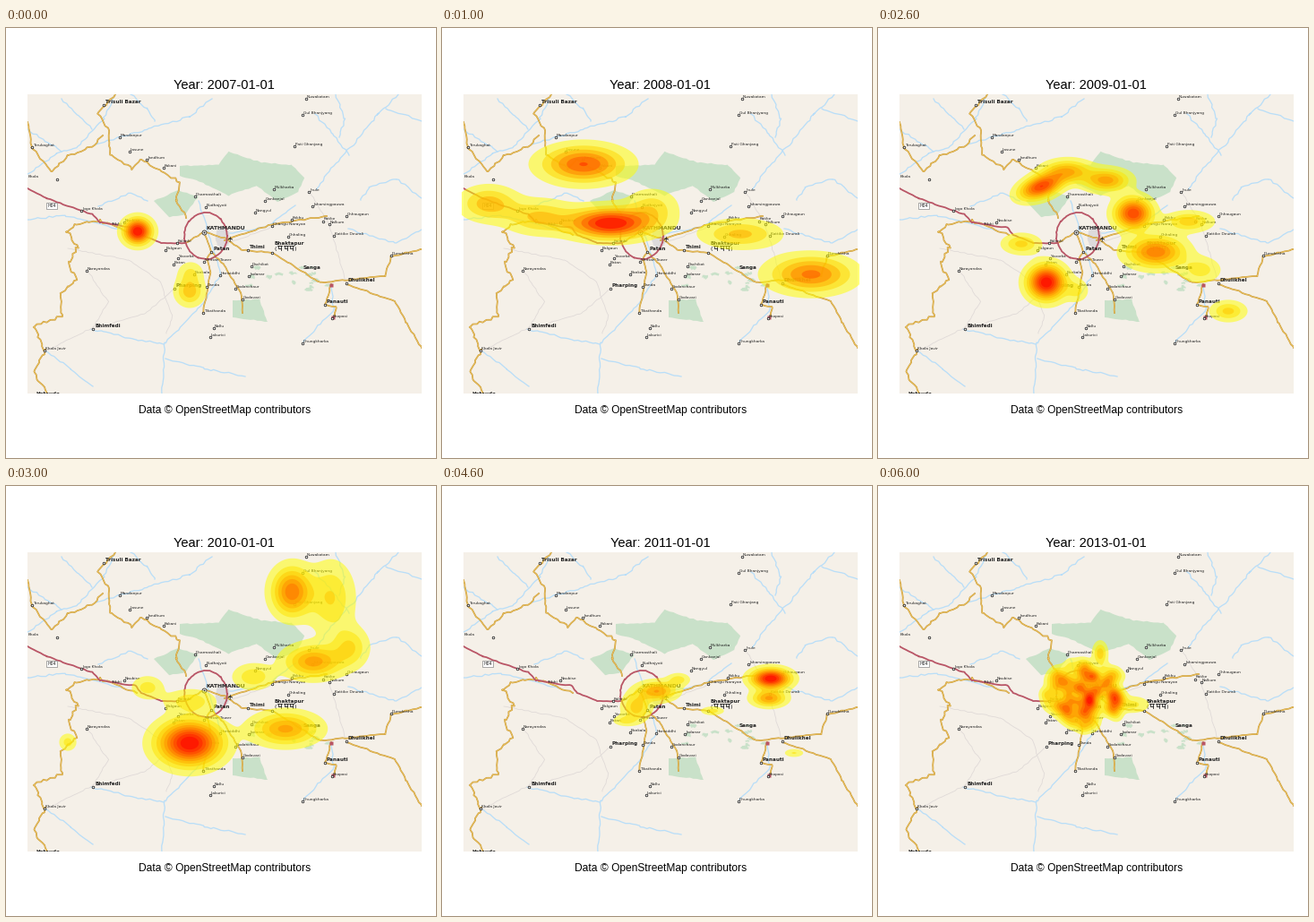
A matplotlib script for the animation above (7 s loop, 480 px wide and 480 px high).

```python
import numpy as np
import matplotlib.pyplot as plt
from matplotlib.animation import FuncAnimation

PT = 0.72  # points per pixel at 100 dpi
PAPER, WOOD, WATER, TOWN = "#f5f0e8", "#c9e1c9", "#b9def8", "#dddbdc"
ROAD, ROAD_EDGE, TRUNK, LANE = "#f0c766", "#c99a35", "#b95566", "#dfd9d7"
INK = "#222222"

rng = np.random.default_rng(7)
fig = plt.figure(figsize=(4.8, 4.8), dpi=100, facecolor="white")


def pixel_axes(x, y, w, h, color):
    """Axes whose data units are stage pixels, y pointing down."""
    ax = fig.add_axes([x / 480, 1 - (y + h) / 480, w / 480, h / 480],
                      facecolor=color)
    ax.set(xlim=(x, x + w), ylim=(y + h, y), xticks=[], yticks=[])
    ax.set_autoscale_on(False)
    ax.spines[:].set_visible(False)
    return ax


base = pixel_axes(24, 74, 440, 334, PAPER)
heat = pixel_axes(0, 0, 480, 480, "none")


def winding(points, amount, step=4):
    """Subdivide a polyline and jitter the new vertices."""
    x, y = np.array(points, float).T
    dist = np.r_[0, np.cumsum(np.hypot(np.diff(x), np.diff(y)))]
    t = np.union1d(dist, np.arange(0, dist[-1], step))
    xy = np.array([np.interp(t, dist, x), np.interp(t, dist, y)])
    xy[:, 1:-1] += rng.uniform(-amount, amount, (2, len(t) - 2))
    return xy


def oval(x, y, rx, ry, count=24):
    a = np.linspace(0, 2 * np.pi, count)
    return list(zip(x + rx * np.cos(a), y + ry * np.sin(a)))


def area(points, color=WOOD, amount=0.6):
    base.fill(*winding(points, amount), color=color, lw=0, zorder=1)


def line(points, color, width, z, amount):
    base.plot(*winding(points, amount), color=color, lw=width * PT, zorder=z)


def river(*points):
    line(points, WATER, 1.3, 2, 1)


def lane(*points):
    line(points, LANE, 0.8, 3, 0.7)


def road(*points, amount=0.7):
    xy = winding(points, amount)
    base.plot(*xy, color=ROAD_EDGE, lw=1.7 * PT, zorder=4)
    base.plot(*xy, color=ROAD, lw=0.7 * PT, zorder=5)


def trunk(points):
    line(points, TRUNK, 1.8, 6, 0.5)


def dot(x, y, size=2.6, color="white"):
    base.plot(x, y, "o", ms=size * PT, mfc=color, mec=INK, mew=0.8 * PT,
              zorder=8)


def label(x, y, name, size=4.4, weight="normal", **style):
    base.text(x, y, name, fontsize=size * PT, weight=weight, color=INK,
              family="DejaVu Sans", zorder=9, clip_on=True, **style)


def town(x, y, name, marked=True):
    if marked:
        dot(x, y)
    label(x + 2, y - 2, name, 5.7, "bold")


def villages(start, end, *names):
    """Spread names evenly from start to end."""
    for (x, y), name in zip(np.linspace(start, end, len(names)), names):
        dot(x, y)
        label(x + 1, y - 1, name)


# woods and built-up land
area([(194, 154), (237, 153), (248, 138), (285, 150), (319, 153), (333, 167),
      (326, 183), (303, 194), (280, 176), (248, 187), (218, 172), (194, 165)])
area([(165, 193), (192, 181), (215, 188), (200, 208), (182, 211)])
area([(253, 304), (283, 303), (292, 328), (253, 323)])
for x, y in rng.uniform((268, 262), (365, 292), (16, 2)):
    area(oval(x, y, rng.uniform(2, 6), rng.uniform(1, 3), 9), amount=1)
area(oval(242, 234, 8, 12), TOWN)

# rivers
river((24, 163), (57, 140), (80, 133), (109, 101), (122, 74))
river((24, 113), (62, 138))
river((230, 79), (205, 99), (158, 113), (100, 130))
river((139, 74), (157, 90), (166, 104))
river((62, 79), (82, 99), (96, 113))
river((438, 74), (415, 96), (394, 123), (357, 164), (347, 180))
river((345, 96), (365, 119), (383, 142))
river((368, 74), (378, 102), (372, 122))
river((464, 104), (424, 90))
river((464, 190), (436, 168), (405, 178), (396, 192))
river((464, 225), (434, 240), (382, 224))
river((24, 214), (66, 209), (132, 226))
river((103, 199), (139, 184), (158, 193))
river((215, 193), (240, 275), (219, 309), (177, 352), (174, 408))
river((176, 353), (146, 348), (95, 336))
river((178, 369), (221, 380), (267, 389))
river((332, 350), (366, 315), (363, 286))
river((250, 229), (292, 222), (323, 198))
river((44, 360), (72, 381), (97, 400))

# lanes
lane((69, 246), (137, 259), (172, 283), (186, 323), (179, 341))
lane((91, 271), (114, 306), (98, 334), (45, 360))
lane((188, 291), (156, 318), (98, 336))
lane((380, 286), (361, 219), (339, 183))
lane((251, 239), (297, 222))

# roads
road((122, 74), (103, 95), (114, 113), (117, 142), (140, 157), (151, 147),
     (194, 172), (190, 192), (201, 212), amount=1.2)
road((24, 105), (29, 133), (51, 160), (69, 143), (97, 132), (108, 120),
     amount=1.2)
road((146, 231), (104, 215), (76, 219), (68, 227), (80, 244), (70, 262),
     (78, 280), (60, 297), (62, 322), (32, 333), (43, 359), (31, 386),
     (46, 408), amount=1.6)
road((248, 237), (262, 247), (297, 251), (351, 284), (423, 277), (430, 255),
     (464, 247))
road((380, 286), (434, 305), (447, 329), (464, 357))
road((363, 286), (356, 309), (369, 311), (366, 323))
road((229, 250), (243, 264), (262, 295), (264, 318))
road((225, 258), (228, 272), (220, 318))
road((244, 237), (298, 219), (358, 210))
road((200, 240), (221, 228), (248, 236))
road((221, 228), (229, 250), (224, 259))
trunk([(24, 179), (45, 190), (96, 208), (105, 217), (145, 223), (151, 231),
       (173, 240), (199, 240)])
trunk(oval(223, 232, 24, 26))
for x, y in ((363, 287), (365, 323)):
    base.plot(x, y, "s", ms=4 * PT, mfc=TRUNK, mec="none", zorder=6)

# place names
town(109, 86, "Trisuli Bazar")
town(188, 291, "Pharping")
town(97, 336, "Bhimfedi")
town(229, 250, "Patan")
town(270, 248, "Thimi")
town(380, 285, "Dhulikhel")
town(356, 309, "Panauti")
town(330, 271, "Sanga", marked=False)
town(297, 244, "Bhaktapur", marked=False)
town(32, 412, "Hetauda", marked=False)
dot(297, 251)
dot(221, 228, 5)
dot(221, 228, 1.2, INK)
label(224, 225, "KATHMANDU", 6.1, "bold")

villages((127, 122), (127, 122), "Mandanpur")
villages((138, 138), (176, 156), "Lasune", "Jandhum", "Kakani")
villages((29, 133), (84, 204), "Tarukaghat", "", "Jogo Khola")
villages((132, 217), (132, 217), "Naubise")
villages((90, 271), (43, 360), "Narayandas", "Khola Javir")
villages((211, 188), (223, 200), "Dharmasthali", "Budhajyoti")
villages((335, 79), (331, 97), "Nuwakotam", "Gul Bhanjyang")
villages((322, 132), (338, 183), "Pati Ghanjang", "Jhule")
villages((299, 180), (278, 206), "Mulkharka", "Gankanjal", "Nangyul")
villages((342, 199), (366, 232), "Jaharsingpauwa", "Katike",
         "Kattike Deurali")
villages((380, 210), (361, 219), "Chhaugaun", "Nalkum")
villages((297, 221), (319, 214), "Changu Narayan", "Kokhu")
villages((315, 233), (430, 254), "Chhaling", "Dumdartha")
villages((191, 240), (178, 248), "Kalanki", "Balgaun")
villages((192, 257), (187, 264), "Yavorka", "Batan")
villages((221, 261), (256, 291), "Shittan Tower", "Harisiddhi", "Godanchaur")
villages((274, 266), (271, 277), "Dachikot", "Jadanar")
villages((210, 275), (224, 289), "Bankala", "Danda")
villages((264, 303), (220, 318), "Godavari", "Tikathanda")
villages((232, 335), (228, 345), "Nallu", "Lakurici")
villages((364, 324), (331, 352), "Khopasi", "Dhungkharka")
label(25, 167, "Khola")
label(117, 220, "Tribhi")

# script line under the town name, drawn as headed strokes
label(299, 248, "(", 6.5)
label(321, 248, ")", 6.5)
for x in (303, 310, 316):
    for dx, dy in (([0, 4.5], [0, 0]), ([3.5, 3.5], [0, 5]),
                   ([1, 1, 3.5], [0, 3, 3])):
        base.plot(np.add(x, dx), np.add(243, dy), color=INK, lw=0.6, zorder=9)

label(251, 235, "\u2708", 8, ha="center", va="center", rotation=90)
label(51, 198.5, "H04", 4.8, ha="center", va="center",
      bbox=dict(boxstyle="square,pad=0.2", fc="white", ec="#888888", lw=0.5))

# density layers
X, Y = np.meshgrid(np.arange(22, 466.5, 1.5), np.arange(70, 412, 1.5))


def bump(x, y, sx, sy, peak, tilt=0):
    a = np.radians(tilt)
    u = (X - x) * np.cos(a) + (Y - y) * np.sin(a)
    v = (Y - y) * np.cos(a) - (X - x) * np.sin(a)
    return peak * np.exp(-(u / sx) ** 2 / 2 - (v / sy) ** 2 / 2)


def density(count, *bumps):
    """Translucent stacked contours from yellow up to red."""
    z = sum(bump(*b) for b in bumps)
    z = z / z.max()
    return [heat.contourf(X, Y, z, [(k + 0.6) / (count + 0.7), 2],
                          colors=[(1, 1 - k / (count - 1), 0)],
                          alpha=0.52, antialiased=True)
            for k in range(count)]


def scatter(count, x, y, rx, ry):
    """Small random bumps filling an oval, weaker towards its rim."""
    for r, a in zip(np.sqrt(rng.random(count)),
                    rng.uniform(0, 2 * np.pi, count)):
        yield (x + rx * r * np.cos(a), y + ry * r * np.sin(a), 5, 5,
               0.19 - 0.11 * r)


years = [
    density(8, (147, 227, 10, 9.2, 1), (205, 294, 10, 10, .38),
            (206, 273, 9, 8, .19)),
    density(7, (188, 218, 30, 11, 1), (52, 196, 20, 12, .42),
            (108, 211, 24, 12, .36), (158, 152, 29, 13, .74),
            (235, 200, 18, 13, .26), (333, 230, 27, 10, .38),
            (412, 275, 29, 13, .64)),
    density(10, (182, 177, 16, 8, .8, -20), (212, 160, 17, 8, .42),
            (255, 170, 16, 8, .48), (285, 207, 13, 11, .8),
            (310, 250, 20, 11, .6), (347, 216, 16, 7, .3),
            (188, 284, 13, 12, 1), (222, 293, 8, 8, .18),
            (160, 241, 13, 7, .28), (391, 316, 12, 7, .28),
            (360, 270, 14, 9, .2)),
    density(10, (205, 287, 22, 15.5, 1), (319, 118, 14, 17, .6),
            (363, 125, 16, 25, .25), (343, 196, 20, 11.5, .48),
            (384, 180, 13, 14, .25), (312, 271, 23, 11.5, .46),
            (276, 213, 14, 9, .23), (158, 225, 11, 8, .2),
            (206, 240, 17, 8, .22), (69, 286, 6, 6, .2)),
    density(9, (367, 215, 13.5, 7, 1), (365, 237, 12, 6, .5),
            (240, 229, 14, 7, .48), (217, 247, 10, 10, .33),
            (264, 216, 8, 4.5, .22), (204, 262, 8, 3.5, .2),
            (302, 251, 8, 3, .22), (393, 298, 7, 3, .18)),
    density(9, (226, 209, 7.5, 5.5, .6), (240, 245, 4.5, 4, .8),
            (227, 230, 8, 10, .33), (224, 247, 7, 5, .3),
            (198, 252, 4.5, 4, .33), (136, 127, 3.5, 4, .17),
            (298, 251, 4.5, 2.5, .18)),
    density(10, *scatter(110, 232, 233, 46, 38), (236, 214, 7, 6, .4),
            (236, 238, 5, 5, .4), (210, 220, 7, 9, .2),
            (248, 187, 5, 8, .3), (284, 244, 12, 6, .17)),
]

title = heat.text(243.5, 68, "", fontsize=14.6 * PT, ha="center",
                  family="Liberation Sans")
heat.text(244, 430, "Data © OpenStreetMap contributors",
          fontsize=12 * PT, ha="center", family="Liberation Sans")


def update(i):
    title.set_text(f"Year: {2007 + i}-01-01")
    for j, layers in enumerate(years):
        for layer in layers:
            layer.set_visible(i == j)


update(0)
anim = FuncAnimation(fig, update, frames=len(years), interval=1000,
                     repeat=True, repeat_delay=0)
plt.show()
```
